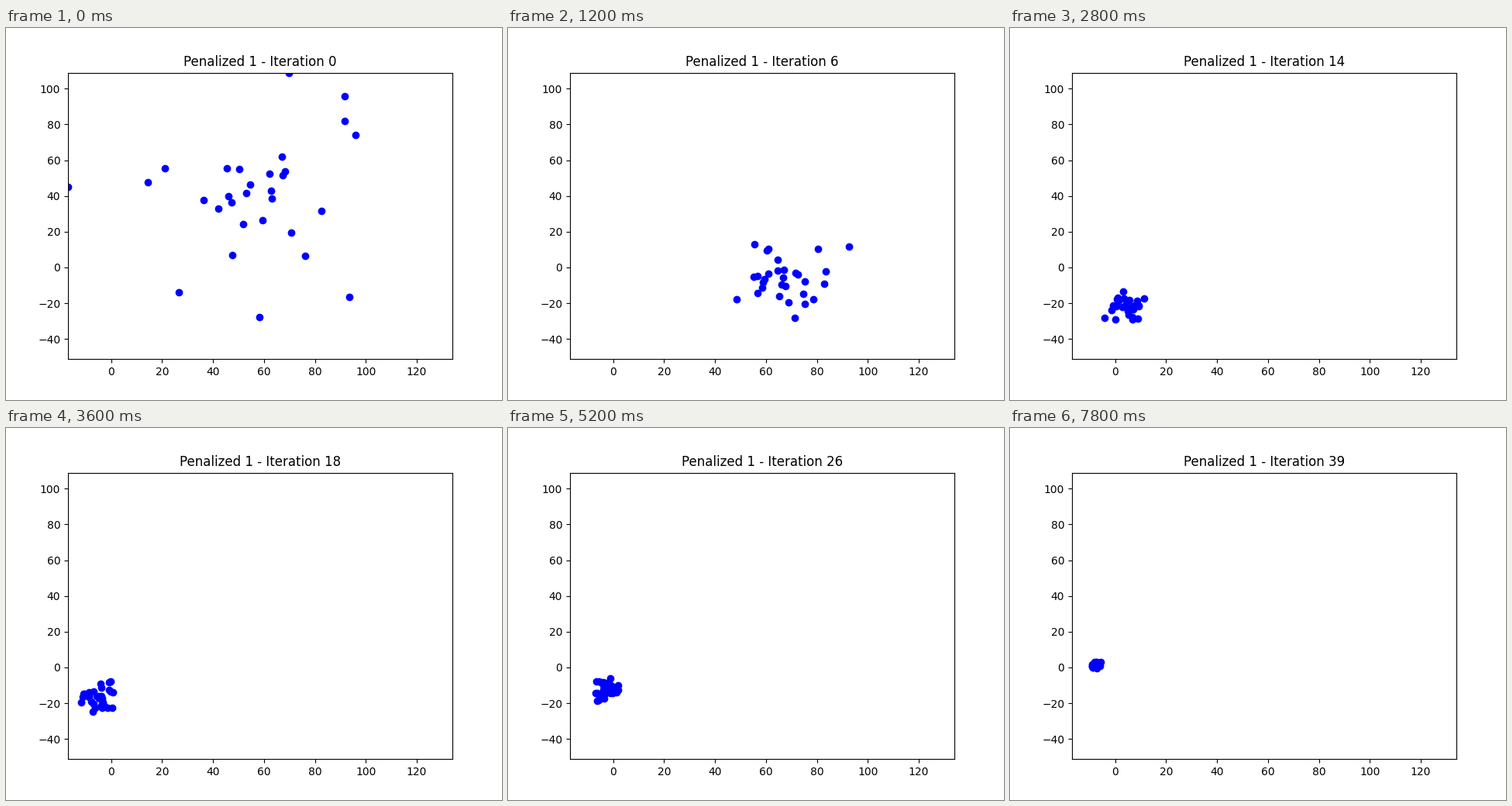
A matplotlib script for the animation above (8000 ms loop, 640 by 480 pixels).

```python
import numpy as np
import matplotlib.pyplot as plt
from matplotlib.animation import FuncAnimation

W, H, DPI = 640, 480, 100
FRAMES, STEP_MS, COUNT = 40, 200, 30
XLIM, YLIM = (-16.97, 133.98), (-51.28, 108.99)
LEFT, TOP, WIDTH, HEIGHT = 80, 57.6, 496, 369.6

# Swarm middle and horizontal spread in pixels: iteration, x, y, spread
PATH = np.array([
    (0, 323, 227, 85), (2, 428, 322, 60), (4, 415, 322, 45),
    (6, 362, 328, 35), (9, 237, 346, 24), (12, 152, 358, 17),
    (14, 149, 358, 13), (16, 118, 355, 13), (18, 120, 346, 13),
    (26, 126, 338, 9.5), (39, 111, 306, 3.2)])
FLATNESS = 0.75     # vertical spread relative to horizontal
SWING = 0.4         # radians per iteration

rng = np.random.default_rng(5)

# Outermost starting particles; the rest fill the middle at random
RIM = np.array([
    (80, 205), (365, 58), (437, 88), (437, 120), (451, 138),
    (443, 347), (327, 373), (223, 341), (183, 199), (205, 181)])
core = rng.normal((345, 232), (55, 38), (COUNT - len(RIM), 2))
START = np.vstack([RIM, core]) - PATH[0, 1:3]
SWAY_A, SWAY_B = rng.uniform(-1.7, 1.7, (2, COUNT, 2))


def to_data(px):
    x = XLIM[0] + (px[:, 0] - LEFT) / WIDTH * (XLIM[1] - XLIM[0])
    y = YLIM[1] - (px[:, 1] - TOP) / HEIGHT * (YLIM[1] - YLIM[0])
    return np.column_stack([np.clip(x, *XLIM), np.clip(y, *YLIM)])


def swarm(i):
    """The start fades out while particles sway around the moving middle."""
    x, y, spread = (np.interp(i, PATH[:, 0], PATH[:, k]) for k in (1, 2, 3))
    sway = SWAY_A * np.cos(SWING * i) + SWAY_B * np.sin(SWING * i)
    sway *= np.sqrt(1 - np.exp(-i)) * spread * np.array([1, FLATNESS])
    return to_data(np.array([x, y]) + START * np.exp(-i / 2) + sway)


fig, ax = plt.subplots(figsize=(W / DPI, H / DPI), dpi=DPI)
ax.set_position([LEFT / W, 1 - (TOP + HEIGHT) / H, WIDTH / W, HEIGHT / H])
dots = ax.scatter(*swarm(0).T, color="blue")
ax.set_xlim(XLIM)
ax.set_ylim(YLIM)
title = ax.set_title("")


def update(i):
    dots.set_offsets(swarm(i))
    title.set_text(f"Penalized 1 - Iteration {i}")
    return dots, title


anim = FuncAnimation(fig, update, frames=FRAMES, interval=STEP_MS,
                     repeat=True, repeat_delay=0, blit=False)
plt.show()
```
